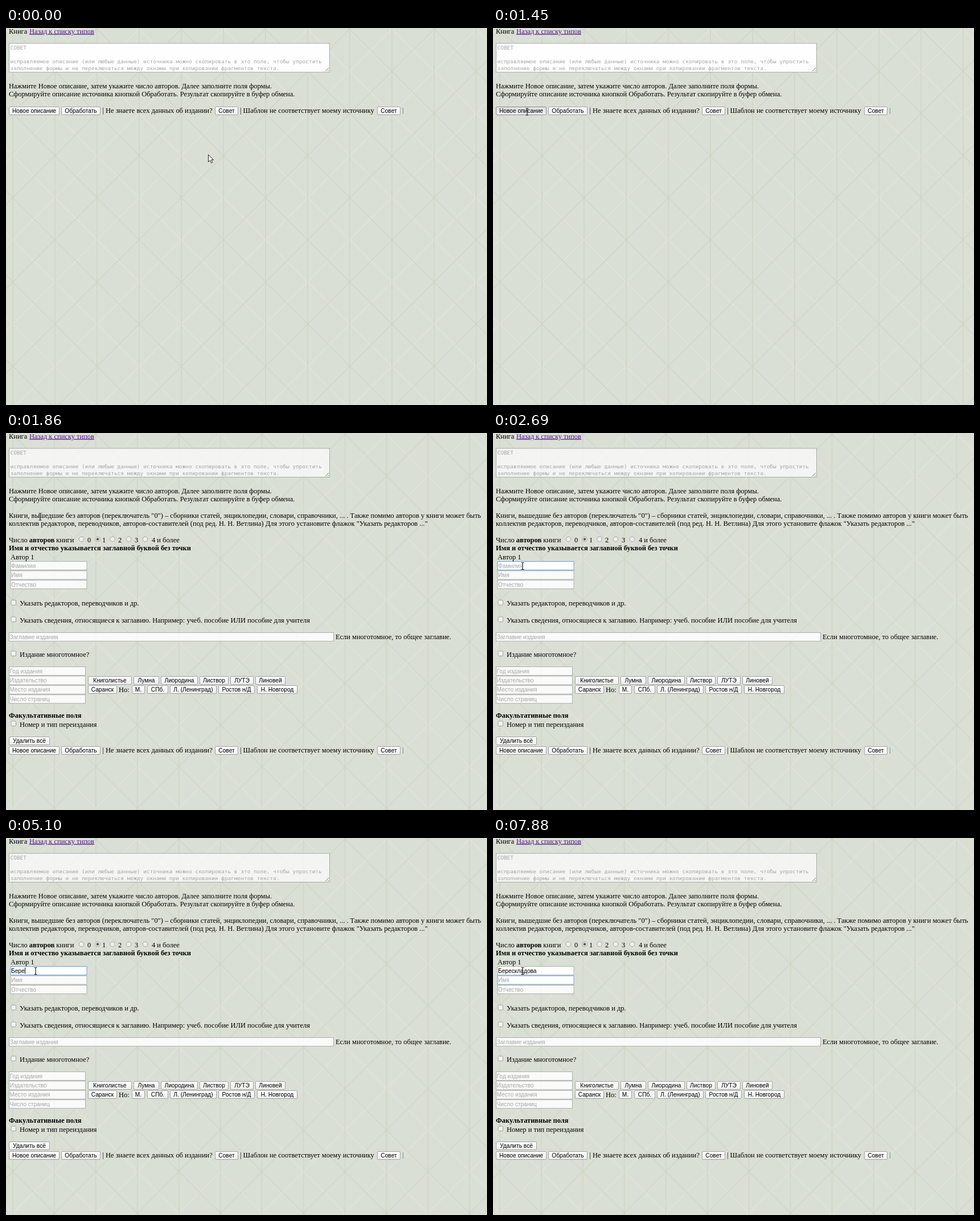
Animation of 845x662 px, one loop 8000 ms. Source, as an HTML page:

```html
<!DOCTYPE html>
<html lang="ru">
<head>
<meta charset="utf-8">
<style>
  html, body { margin: 0; width: 100%; height: 100%; overflow: hidden; background: #dadfd5; }
  svg { display: block; }
  text { font: 12.44px "Liberation Serif", "Times New Roman", serif; white-space: pre; }
  .ui { font: 10.2px "Liberation Sans", Arial, sans-serif; }
  .mono { font: 9.47px "DejaVu Sans Mono", monospace; }
  .b { font-weight: bold; }
  .hint { fill: #a6a6a6; }
  .link { fill: #551a8b; text-decoration: underline; }
  .btn { fill: url(#face); stroke: #a3a3a1; }
  .box { fill: #fff; fill-opacity: .85; stroke: #adb0ab; }
  .focus { fill-opacity: 1; stroke: #6d9be6; }
</style>
</head>
<body>
<svg id="stage" width="845" height="662" viewBox="0 0 845 662"></svg>
<script>
const LOOP = 8000;
const SURNAME = 'Берескладова';
const $ = id => document.getElementById(id);

const text = (x, y, s, cls = '') => `<text x="${x}" y="${y}" class="${cls}">${s}</text>`;
const button = (x, y, w, label, id = '') =>
  `<rect ${id && `id="${id}"`} class="btn" x="${x + .5}" y="${y + .5}" width="${w - 1}" height="14" rx="1.5"/>
   <text class="ui" x="${x + w / 2}" y="${y + 11.2}" text-anchor="middle">${label}</text>`;
const input = (x, y, w, hint, id = '') =>
  `<rect id="${id}" class="box" x="${x + .5}" y="${y + .5}" width="${w - 1}" height="15"/>
   <text id="${id}Hint" class="ui hint" x="${x + 1.5}" y="${y + 11.5}">${hint}</text>`;
const check = (y, label) =>
  `<rect x="9" y="${y - 9.5}" width="8.5" height="8.5" rx="1.5" fill="#f2f3f0" stroke="#a0a29d"/>` + text(24, y, label);
const radio = (x, labelX, label, on) =>
  `<circle cx="${x}" cy="186.5" r="4.3" fill="#eff0ed" stroke="#a0a29d"/>` +
  (on ? `<circle cx="${x}" cy="186.5" r="2.3" fill="#555"/>` : '') + text(labelX, 191.5, label);
const buttons = (y, list) => list.map(([x, w, label]) => button(x, y, w, label)).join('');

const defs = `<defs>
  <linearGradient id="face" x2="0" y2="1"><stop stop-color="#fff"/><stop offset="1" stop-color="#eeeeed"/></linearGradient>
  <linearGradient id="pressed" x2="0" y2="1"><stop stop-color="#dcdddc"/><stop offset="1" stop-color="#f3f3f3"/></linearGradient>
  <pattern id="argyle" width="148" height="148" patternUnits="userSpaceOnUse">
    <rect width="148" height="148" fill="#dadfd5"/>
    <g fill="none" stroke-width="1.4">
      <path d="M74 0L148 74 74 148 0 74Z" stroke="#e1e5de"/>
      <path d="M0 0V148M74 0V148M148 0V148" stroke="#d0d7c6" stroke-width="1.6"/>
      <path d="M-2-2L150 150M150-2L-2 150" stroke="#cfd5c6"/>
    </g>
  </pattern></defs>`;

const header =
  text(5, 9.5, 'Книга') + text(41, 9.5, 'Назад к списку типов', 'link') +
  `<rect id="memo" x="5.5" y="27" width="563" height="50.5" fill="#fff" stroke="#a9aba6"/>
   <path d="M561 76l6-6M565 76l2-2" stroke="#777"/>` +
  text(7.5, 38, 'СОВЕТ', 'mono hint') +
  text(7.5, 61.5, 'исправляемое описание (или любые данные) источника можно скопировать в это поле, чтобы упростить', 'mono hint') +
  text(7.5, 73.5, 'заполнение формы и не переключаться между окнами при копировании фрагментов текста.', 'mono hint') +
  text(5, 106, 'Нажмите Новое описание, затем укажите число авторов. Далее заполните поля формы.') +
  text(5, 120, 'Сформируйте описание источника кнопкой Обработать. Результат скопируйте в буфер обмена.');

const actions =
  button(5, 138, 89, 'Новое описание', 'create') + button(97, 138, 69, 'Обработать') +
  text(169.5, 149, '| Не знаете всех данных об издании?') + button(367, 138, 41, 'Совет') +
  text(411, 149, '| Шаблон не соответствует моему источнику') + button(652, 138, 41, 'Совет') +
  '<path d="M697.5 140v11" stroke="#5fa39b"/>';

const form =
  text(5, 148.5, 'Книги, вышедшие без авторов (переключатель "0") – сборники статей, энциклопедии, словари, справочники, ... . Также помимо авторов у книги может быть') +
  text(5, 162.5, 'коллектив редакторов, переводчиков, авторов-составителей (под ред. Н. Н. Ветлина) Для этого установите флажок "Указать редакторов ..."') +
  text(5, 191.5, 'Число <tspan class="b">авторов</tspan> книги') +
  radio(132.5, 143, '0') + radio(161, 169, '1', true) + radio(187, 197, '2') +
  radio(215.5, 226, '3') + radio(244.5, 256, '4 и более') +
  text(5, 205.5, 'Имя и отчество указывается заглавной буквой без точки', 'b') +
  text(8, 222, 'Автор 1') +
  input(7.5, 225, 135, 'Фамилия', 'last') + input(7.5, 241.5, 135, 'Имя', 'first') + input(7.5, 258, 135, 'Отчество') +
  check(303, 'Указать редакторов, переводчиков и др.') +
  check(332.5, 'Указать сведения, относящиеся к заглавию. Например: учеб. пособие ИЛИ пособие для учителя') +
  input(5, 350, 571, 'Заглавие издания') + text(579, 362, 'Если многотомное, то общее заглавие.') +
  check(392.5, 'Издание многотомное?') +
  ['Год издания', 'Издательство', 'Место издания', 'Число страниц']
    .map((hint, i) => input(5, 410 + 16.4 * i, 135, hint)).join('') +
  buttons(427, [[144, 77, 'Книголистье'], [224, 45, 'Лумна'], [272, 65, 'Лиородина'],
    [340, 51, 'Листвор'], [394, 41, 'ЛУТЭ'], [438, 53, 'Линовей']]) +
  buttons(443, [[144, 51, 'Саранск'], [221, 23, 'М.'], [248, 37, 'СПб.'],
    [288, 82, 'Л. (Ленинград)'], [373, 64, 'Ростов н/Д'], [441, 71, 'Н. Новгород']]) +
  text(198, 454.5, 'Но:') +
  text(5, 500, 'Факультативные поля', 'b') + check(515.5, 'Номер и тип переиздания') +
  button(5, 533, 72, 'Удалить всё') +
  '<text id="typed" class="ui" x="9" y="236.8"></text><path id="caret" d="M.5 0v11" stroke="#000"/>';

const pointers =
  `<path id="arrow" d="M.5.5V13L3.5 10.3 5.7 15 7.8 14 5.7 9.5H9.5Z" fill="#fff" stroke="#222"/>
   <path id="beam" d="M-2.5-6H-.8L0-5.3.8-6H2.5M0-5.3V5.3M-2.5 6H-.8L0 5.3.8 6H2.5" fill="none" stroke="#222" stroke-width="1.2"/>`;

$('stage').innerHTML = defs + '<rect width="845" height="662" fill="url(#argyle)"/>' + header +
  `<g id="form">${form}</g><g id="actions">${actions}</g>` + pointers;

// Last entry [time, ...values] that has already begun.
const at = (steps, t) => steps.findLast(step => t >= step[0]);

const pointerSteps = [[0, 355, 222], [200, 290, 203], [410, 180, 176], [610, 95, 153], [820, 60, 147],
  [2060, 58, 170], [2270, 54, 208], [2470, 52, 233.5]];
const typingSteps = [[0, 0], [4440, 1], [4660, 2], [4880, 3], [5100, 4], [5540, 5], [5750, 6], [5960, 7],
  [6400, 8], [6610, 9], [6820, 10], [7030, 12]];
const caretSteps = [[0, 0], [2910, 1], [3350, 0], [3990, 1], [7880, 0]];

const show = (id, on) => $(id).style.display = on ? '' : 'none';
const move = (id, x, y) => $(id).setAttribute('transform', `translate(${x} ${y})`);

function draw(t) {
  const open = t >= 1650, second = t >= 7440;
  const [, x, y] = at(pointerSteps, t);
  const count = at(typingSteps, t)[1];

  $('argyle').setAttribute('patternTransform', `scale(${open ? .986 : 1}) translate(12 2)`);
  $('memo').setAttribute('fill-opacity', open ? .7 : .98);
  show('form', open);
  $('form').style.opacity = t < 1860 ? .42 : 1;
  move('actions', 0, open ? 412 : 0);
  $('create').style.fill = t >= 1450 && !open ? 'url(#pressed)' : '';
  $('create').style.stroke = t >= 820 && !open ? '#8c8c98' : '';

  $('last').classList.toggle('focus', t >= 2690 && !second);
  $('last').style.fillOpacity = count ? 1 : '';
  $('first').classList.toggle('focus', second);
  show('lastHint', !count);
  $('typed').textContent = SURNAME.slice(0, count);
  const end = count && !second ? $('typed').getComputedTextLength() : 0;
  move('caret', Math.round(9 + end), second ? 244 : 227.5);
  show('caret', at(caretSteps, t)[1]);

  const beam = t >= 820;
  show('arrow', !beam);
  show('beam', beam);
  move(beam ? 'beam' : 'arrow', x, y);
}

function tick() {
  draw(performance.now() % LOOP);
  requestAnimationFrame(tick);
}
tick();
</script>
</body>
</html>
```
